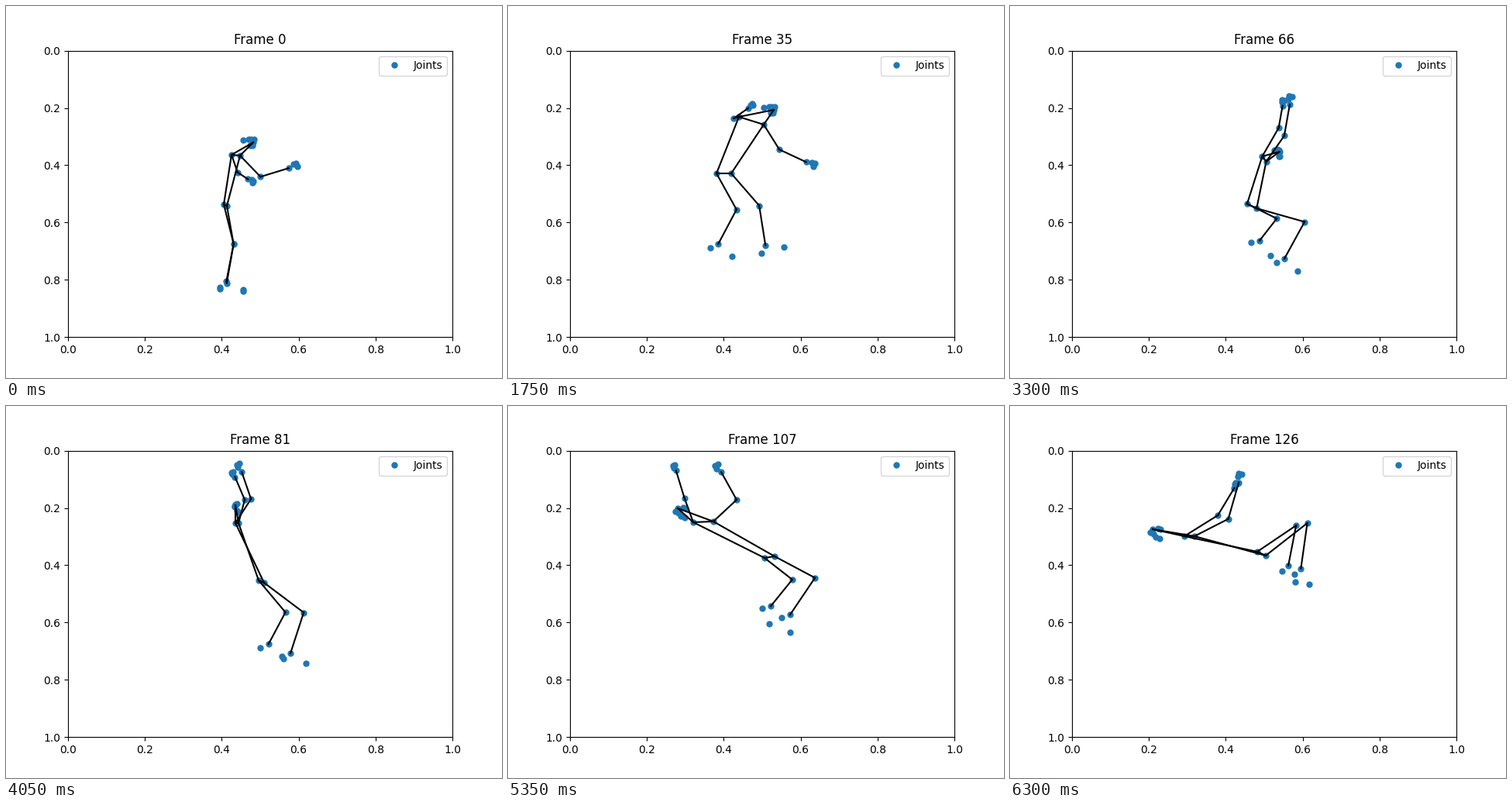
A matplotlib script for the animation above (6350 ms loop, 640 by 480 pixels).

```python
import numpy as np
import matplotlib.pyplot as plt
from matplotlib.animation import FuncAnimation

FRAMES, STEP = 127, 50
FRAME = np.arange(FRAMES)
POSES = (0, 19, 35, 52, 81, 107, 126)
SWING = (0, 19, 26, 35, 46, 52, 59, 66, 81, 107, 126)


def curve(*v, t=POSES):
    """Smooth cubic through key values, sampled once per frame."""
    t, v = np.array(t, float), np.array(v)
    m, h = np.gradient(v, t), np.diff(t)
    k = np.clip(np.searchsorted(t, FRAME, side="right") - 1, 0, len(h) - 1)
    s = (FRAME - t[k]) / h[k]
    return ((1 + 2 * s) * (1 - s) ** 2 * v[k] + s * (1 - s) ** 2 * h[k] * m[k]
            + s * s * (3 - 2 * s) * v[k + 1] + s * s * (s - 1) * h[k] * m[k + 1])


def ramp(start, end):
    return np.clip((FRAME - start) / (end - start), 0, 1)


def grow(a, b):
    return np.linspace(a, b, FRAMES)


def limb(root, upper, lower, size_upper, size_lower):
    """Two bones given by angle (degrees, clockwise) and length."""
    aim = np.exp(1j * np.radians(lower))
    mid = root + size_upper * np.exp(1j * np.radians(upper))
    return mid, mid + size_lower * aim, aim


def hand(wrist, aim, size):
    return [wrist + size * p * aim for p in (7 - 3j, 11 - 3j, 11 + 1j)]


def foot(ankle, aim):
    toe = (6 - 23j) + (13 + 10j) * ramp(88, 107)  # toes point after take-off
    return [ankle + (9 + 7j) * aim, ankle + toe * aim]


# Trunk: points are x + yj in stage pixels
hip = curve(283 + 257j, 285 + 244.5j, 278.5 + 216j, 294 + 268j,
            329.5 + 226.5j, 337.5 + 195j, 324.5 + 190.5j)
chest = hip + curve(13.5 - 64.5j, 13 - 73.5j, 35.5 - 68j, 47 - 49j,
                    -31.5 - 75.5j, -85.5 - 45.5j, -93 - 22.5j)
nose = chest + curve(22.5 - 16.5j, 20 - 15j, 29 - 14j, 33,
                     -2 - 23j, -33 - 17.5j, -47.5 - 9j)
shoulder_half = curve(5.5 + .5j, 5 + 1j, 16 + 5j, 10 + 6j, -2, 13 - .5j, 6.5)
hip_half = curve(2 + 1j, 0, 9.5, 9 + 3j, 3.5 + 1.5j, 6.5 - 1j, 5.5 + 2.5j)
l_shoulder, r_shoulder = chest + shoulder_half, chest - shoulder_half
l_hip, r_hip = hip + hip_half, hip - hip_half

# Arms
arm = curve(38, 38, 38, 43, 37, 41, 49)
l_elbow, l_wrist, l_reach = limb(
    l_shoulder,
    curve(46, 65, 62, 58, 140, 138, 10, -55, -57, -43, -27, t=SWING),
    curve(-17, -10, 0, 25, 165, 138, -20, -80, -109, -119, -74, t=SWING),
    arm, arm)
r_elbow, r_wrist, r_reach = limb(
    r_shoulder,
    curve(71, 116, 160, 164, 150, 133, 10, -60, -75, -110, -32, t=SWING),
    curve(33, 81, 170, 325, 525, 474, 340, 280, 247, 253, 301, t=SWING),
    curve(24, 39, 7, 43, 31, 33, 51), grow(16, 41))

# Legs: the right one is foreshortened
thigh, shin = curve(50, 52, 55, 62, 64, 59, 68), grow(49, 59)
depth = curve(1.05, 1.05, .97, .6, .84, .77, .89)
l_knee, l_ankle, l_shin = limb(l_hip, curve(80, 82, 49, 7, 37, 28, -38),
                               curve(101, 107, 81, 120, 108, 124, 98),
                               thigh, shin)
r_knee, r_ankle, r_shin = limb(r_hip, curve(76, 82, 61, 16, 50, 38, -34),
                               curve(100, 105, 118, 134, 118, 129, 101),
                               thigh * depth, shin * depth)

# Eyes, ears and mouth: upright layout turning into tipped-back layout
upright = (1 - 4j, -3 - 4j, -6 - 4j, -13 - 3j, -1 + 4j, -4 + 4j)
tipped = (-3 + 4j, 1 + 6j, 7 - 1j, 9.5, 4 + 10j, 9 + 12j)
tip = ramp(52, 102)
face = [nose + (1 - tip) * a + tip * b for a, b in zip(upright, tipped)]

body = [nose, l_shoulder, r_shoulder, l_elbow, r_elbow, l_wrist, r_wrist,
        l_hip, r_hip, l_knee, r_knee, l_ankle, r_ankle]
parts = (hand(l_wrist, l_reach, 1) + hand(r_wrist, r_reach, .65)
         + foot(l_ankle, l_shin) + foot(r_ankle, r_shin))
BONES = [(0, 1), (0, 2), (1, 2), (7, 8)]
BONES += [(i, i + 2) for i in (1, 2, 3, 4, 7, 8, 9, 10)] + [(1, 7), (2, 8)]

# Stage pixels to axes data
joints = np.stack(body + face + parts)
xs, ys = (joints.real - 80) / 496, (joints.imag - 57.6) / 369.6

fig, ax = plt.subplots(figsize=(6.4, 4.8), dpi=100)
ax.set_xlim(0, 1)
ax.set_ylim(1, 0)
dots, = ax.plot([], [], "o", markersize=5, label="Joints")
bones = [ax.plot([], [], "k-")[0] for _ in BONES]
ax.legend(loc="upper right")
title = ax.set_title("Frame 0")


def draw(i):
    dots.set_data(xs[:, i], ys[:, i])
    for line, (a, b) in zip(bones, BONES):
        line.set_data([xs[a, i], xs[b, i]], [ys[a, i], ys[b, i]])
    title.set_text(f"Frame {i}")
    return [dots, *bones, title]


anim = FuncAnimation(fig, draw, frames=FRAMES, interval=STEP,
                     repeat=True, repeat_delay=0, blit=False)
plt.show()
```
